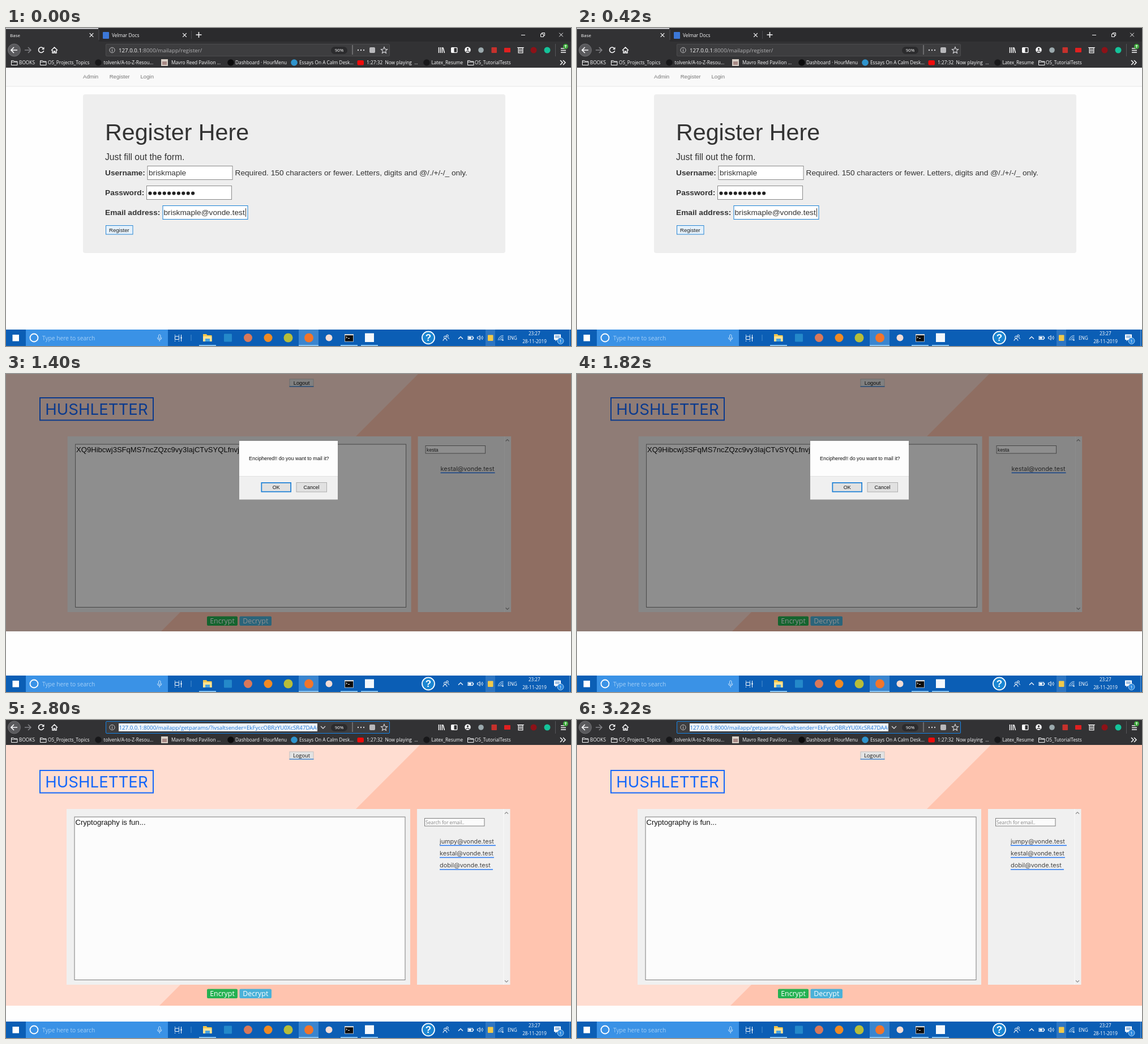
Animation of 998x561 px, one loop 3.5 s. Source, as an HTML page:

```html
<!DOCTYPE html>
<html lang="en">
<head>
<meta charset="utf-8">
<title>Mail app walkthrough</title>
<style>
  html, body { margin: 0; width: 100%; height: 100%; overflow: hidden; background: #fefefe; }
  #stage { display: block; width: 998px; height: 561px; font-family: "Liberation Sans", Arial, sans-serif; }
  .ui { font-family: "Open Sans", "Noto Sans", sans-serif; }
  .rb { font-family: Roboto, sans-serif; }
  .geo { font-family: Inter, sans-serif; }
  text { white-space: pre; }
</style>
</head>
<body>
<svg id="stage" viewBox="0 0 998 561"></svg>
<script>
const STEP = 700;
const USER = 'briskmaple', FRIEND = 'kestal', HOST = '@vonde.test';
const LINK = '127.0.0.1:8000/mailapp/getparams/?ivsaltsender=EkFyccOBRzYU0XcSR47DAA==|@@@@@|STee25g1e7g=|!!!!!|jumpy' + HOST;

// Drawing helpers, each returns SVG markup
const rect = (x, y, w, h, fill, more = '') =>
  `<rect x="${x}" y="${y}" width="${w}" height="${h}" fill="${fill}" ${more}/>`;
const box = (x, y, w, h, fill, line, lw = 1, more = '') =>
  rect(x + lw / 2, y + lw / 2, w - lw, h - lw, fill, `stroke="${line}" stroke-width="${lw}" ${more}`);
const disc = (x, y, r, fill, more = '') => `<circle cx="${x}" cy="${y}" r="${r}" fill="${fill}" ${more}/>`;
const path = (d, line, lw = 1, fill = 'none', more = '') =>
  `<path d="${d}" stroke="${line}" stroke-width="${lw}" fill="${fill}" ${more}/>`;
const text = (x, y, size, str, fill = '#333', more = '') =>
  `<text x="${x}" y="${y}" font-size="${size}" fill="${fill}" ${more}>${str}</text>`;
const ui = (x, y, size, str, fill = '#fff', more = '') => text(x, y, size, str, fill, 'class="ui" ' + more);
const move = (x, y, s) => `<g transform="translate(${x} ${y})">${s}</g>`;
const clip = (x, y, w, h, s) =>
  `<svg x="${x}" y="${y}" width="${w}" height="${h}" viewBox="${x} ${y} ${w} ${h}">${s}</svg>`;
const dots = (n, x, y, gap, r, fill) =>
  Array.from({ length: n }, (_, i) => disc(x + i * gap, y, r, fill)).join('');
const cross = (x, y, r, line, lw = 1.2) =>
  path(`M${x - r} ${y - r}l${2 * r} ${2 * r}m0 ${-2 * r}l${-2 * r} ${2 * r}`, line, lw);
const caret = (x, y, fill) => path(`M${x - 3} ${y - 1.5}h6l-3 3z`, 'none', 0, fill);
const BOLD = 'font-weight="700"', MID = 'text-anchor="middle"';

function folder(x, y) {
  return path(`M${x + .5} ${y - 3.5}h4l1.5 1.5h5v6.5h-10.5zM${x + .5} ${y - 1}h10`, '#f9f9fa', 1);
}

function urlField(focused) {
  const frame = box(176, 28, 502, 22, '#3d3d3f', focused ? '#1583e6' : '#4c4c4e', 1, 'rx="1.5"');
  const info = disc(187.5, 39, 4.6, 'none', 'stroke="#c4c4c6"') + rect(187, 38, 1, 4, '#c4c4c6') + rect(187, 36, 1, 1.2, '#c4c4c6');
  const url = focused
    ? clip(199, 31, 351, 16, rect(199, 32, 351, 14, '#eef4fb') + ui(199.5, 43, 9.7, LINK, '#1b74d4')) +
      path('M556 37l4 4 4-4', '#d7d7db', 1.3)
    : ui(199, 43, 9.7, '127.0.0.1<tspan fill="#b1b1b3">:8000/mailapp/register/</tspan>', '#f9f9fa');
  return frame + info + url +
    rect(574, 33, 29, 13, '#2b2b2d', 'rx="6.5"') + ui(588.5, 42.3, 8, '90%', '#fff', MID) +
    rect(611.5, 30, 1, 17, '#9a9a9c') + dots(3, 622, 39, 5, 1.2, '#d7d7db') +
    rect(642, 34, 10, 10, '#b9b9bc', 'rx="2"') +
    path('M668 33.5l1.6 3.7 4 .4-3 2.7.9 4-3.5-2.1-3.5 2.1.9-4-3-2.7 4-.4z', '#d7d7db', 1.1);
}

function chrome(focused) {
  const w = '#f9f9fa';
  const tabs = rect(0, 0, 998, 70, '#323234') + rect(164, 0, 834, 24, '#2b2b2d') +
    rect(0, 0, 163, 1.6, '#e4e4e8') + rect(163.5, 3, 1, 18, '#55555a') + rect(327, 5, 1, 14, '#4a4a4d') +
    ui(7, 15.5, 8, 'Base', w) + cross(151, 12.5, 3.3, w) +
    rect(171, 7, 11, 12, '#3c78d8', 'rx="1"') + ui(187, 15.5, 8.3, 'Velmar Docs', w) + cross(315.5, 12.5, 3.3, w) +
    path('M335.5 12h10M340.5 7v10', w, 1.5) + path('M910 12.5h7', w, 1) +
    path('M944.5 10.5h5v5h-5zM946.500 10.500v-2h5v5h-2', w, 1) + cross(980.5, 12, 3.3, w, 1);
  const nav = disc(14.5, 39, 11, '#5a5a5d', 'stroke="#7a7a7d" stroke-width=".8"') +
    path('M20 39h-10.500M14 34l-5 5 5 5', w, 1.7) + path('M33 39h10.500M39 34l5 5-5 5', '#838386', 1.5) +
    path('M66 36a4.700 4.700 0 1 0 .7 4', w, 1.6) + path('M67.500 33.500v4.500h-4.500z', 'none', 0, w) +
    path('M80 39.500l5.500-5.500 5.500 5.500M82 39v5h2.500v-3h2v3h2.500v-5', w, 1.5);
  const tools = path('M764.500 34v10M767.500 34v10M770.500 34v10M772 34.500l2.500 9.500', w, 1.5) +
    box(786, 34, 11.5, 10, 'none', w, 1.3, 'rx="1"') + rect(787, 35, 4.5, 8, w) +
    disc(815.5, 38.5, 5.3, w) + disc(815.5, 37, 1.7, '#323234') + path('M812.500 42q3-3 6 0', '#323234', 1.2) +
    disc(839, 39, 4.8, '#9ba9ad') + rect(857.5, 34, 9.5, 10, '#c6312c', 'rx="1"') +
    rect(880, 35, 11, 8, '#e02020', 'rx="1"') +
    box(904.5, 34.5, 9, 10, 'none', w, 1.2) + path('M903 34.500h12M907 37v5M909 37v5M911 37v5', w, 1) +
    disc(932, 39, 5.5, '#8d1218') + disc(956, 39, 5.5, '#15c39a') +
    rect(970, 28, 1, 22, '#55555a') + path('M980 36h9M980 39.500h9M980 43h9', w, 1.5) +
    disc(988.5, 32.5, 4.5, '#3fa83c') + path('M988.500 35v-4.500M986.500 32l2-2 2 2', '#fff', 1);
  const marks = [[23, 'BOOKS'], [74, 'OS_Projects_Topics'], [172.5, 'tolvenk/A-to-Z-Resou...'],
    [292, 'Mavro Reed Pavilion ...'], [405, 'Dashboard · HourMenu'], [518, 'Essays On A Calm Desk...'],
    [637, '1:27:32  Now playing  ...'], [751.5, 'Latex_Resume'], [828, 'OS_TutorialTests']];
  const icons = folder(9, 61) + folder(60, 61) + folder(815, 61) +
    disc(163, 61, 5.8, '#18181a') + disc(743, 61, 5.8, '#18181a') + disc(397, 61, 5.8, '#0c0c0d') +
    rect(274, 55, 12, 12, '#d8cfc6') + rect(276, 59, 8, 6, '#a88a86') +
    disc(509, 61, 5.8, '#2f94cd') + rect(620.5, 57, 11.5, 8.5, '#f00b0b', 'rx="2"');
  return tabs + nav + urlField(focused) + tools + icons +
    marks.map(([x, s]) => ui(x, 64, 8.3, s, w)).join('') +
    path('M979 57l4 4-4 4M984 57l4 4-4 4', w, 1.5);
}

function site(x, w, h, title, body) {
  const grey = '#777';
  return rect(0, 0, 998, 33, '#f9f9f9') + rect(0, 32.5, 998, 1, '#e8e8e8') +
    text(x, 19, 9.6, 'Admin', grey) + text(x + 46.7, 19, 9.6, 'Register', grey) + text(x + 101.5, 19, 9.6, 'Login', grey) +
    rect(x, 47, w, h, '#eee', 'rx="4"') + text(x + 39, 128, 41.2, title) + body;
}

function registerScene() {
  const row = (y, label, x, line) =>
    text(175, y + 17, 13.7, label, '#333', BOLD) + box(x, y, 151, 25, '#fff', line);
  const body = text(175, 163, 15.7, 'Just fill out the form.') +
    row(173, 'Username:', 249.5, '#8a8a8a') + text(252, 190, 13.7, USER) +
    text(404.5, 190, 13.7, 'Required. 150 characters or fewer. Letters, digits and @/./+/-/_ only.') +
    row(208, 'Password:', 248, '#8a8a8a') + dots(10, 254.5, 221.5, 8.4, 3.1, '#222') +
    row(243, 'Email address:', 276.5, '#1a82d6') + text(278.5, 260, 13.7, USER + HOST) + rect(423, 248, 1, 15, '#333') +
    box(176, 278, 48.500, 16.500, '#e5f1fb', '#2a87d4') + text(182, 289.5, 9.6, 'Register', '#222');
  return move(0, 70, site(136, 746, 280, 'Register Here', body)) + chrome(false);
}

function loginScene() {
  const body = text(176, 155, 9.7, 'Username:', '#333', BOLD) + box(228.5, 143, 123, 17.500, '#fff8c6', '#8a8a78') +
    text(230.5, 155, 9.6, FRIEND) +
    text(354.5, 155, 9.7, 'Password:', '#333', BOLD) + box(405, 143, 123.500, 17.500, '#fff8c6', '#8a8a78') +
    dots(6, 410, 152.3, 5.9, 2.3, '#222') +
    box(532, 143.500, 36, 16, '#e1e1e1', '#b4b4b4') + text(538, 155, 9.6, 'Login', '#222');
  return site(137, 749, 146, 'Login here :', body);
}

// Encryption page; panels shift by dx when the page is scrolled
function cipherPage({ dx, body, search, typed, emails, logoutFont }) {
  const row = ([name, w], i) =>
    text(766, 218 + i * 21.2, 10.9, name + HOST, '#444', 'class="geo"') + rect(766, 220.5 + i * 21.2, w, 1.6, '#2f7cf0');
  const panels = rect(107, 157, 607, 310, '#f0f0f0') + box(120.500, 170.500, 585, 288.500, '#fcfcfc', '#7d7d7d') +
    text(122.5, 185, 13.05, body, '#111') +
    rect(726, 157, 164.500, 310, '#f0f0f0') + rect(878.5, 157, 1, 310, '#fafafa') +
    path('M881 165.500l3-3 3 3M881 459.500l3 3 3-3', '#909090', 1.2) +
    box(739, 173, 106.500, 14.500, '#fcfcfc', '#7d7d7d') +
    (typed ? text(741.5, 183.5, 8.6, search, '#222') : ui(741, 183.5, 8.5, search, '#858585')) +
    emails.map(row).join('');
  const button = (x, w, fill, s) =>
    rect(x, 474.5, w, 16.5, fill, 'rx="2"') + ui(x + w / 2, 487.3, 12.4, s, '#fff', MID);
  return rect(0, 44, 998, 460, '#ffddd1') + path('M731 44H998V504H271z', 'none', 0, '#ffc4af') +
    box(500.500, 55.500, 43, 14, '#e3e3e3', '#c2c2c2') + rect(500.5, 68.5, 43, 1.3, '#2f80d8') +
    text(522, 65.7, 9.3, 'Logout', '#111', MID + logoutFont) +
    box(59, 88, 202, 41.500, 'none', '#1467fa', 2) +
    text(160, 118.500, 27.6, 'HUSHLETTER', '#1467fa', MID + ' class="geo"') +
    move(dx, 0, panels) + button(355, 54, '#25b152', 'Encrypt') + button(412.5, 56.5, '#4ab1d8', 'Decrypt');
}

function confirmScene() {
  const page = cipherPage({
    dx: 1.6, body: 'XQ9Hibcwj3SFqMS7ncZQzc9vy3IajCTvSYQLfnvj', search: FRIEND.slice(0, 5),
    typed: true, emails: [[FRIEND, 96]], logoutFont: ''
  });
  const dialog = rect(412, 118, 174, 103.5, '#f0f0f0') + rect(412, 118, 174, 62.5, '#fdfdfd') + rect(412, 180, 174, 1, '#e2e2e2') +
    text(429, 152, 8.95, 'Enciphered!! do you want to mail it?', '#111') +
    box(450.500, 191, 53.500, 17.500, '#e1e1e1', '#1a7fd6', 1.7) + text(477.3, 202.5, 9, 'OK', '#111', MID) +
    box(512.500, 191, 54.500, 17.500, '#e1e1e1', '#adadad') + text(539.5, 202.5, 9, 'Cancel', '#111', MID);
  return clip(0, 0, 998, 454, move(0, -47, cipherPage && page) + path('M275 454l-4 4h727v-4z', 'none', 0, '#ffc4af') +
    rect(0, 0, 998, 454, '#000', 'opacity=".44"')) + dialog;
}

function composeScene() {
  const g = '#606367', rb = 'class="rb" ';
  const line = (x, y, w) => `M${x} ${y}h${w}`;
  const rows = (x, w) => [401.5, 405.5, 409.5].map(y => line(x, y, w)).join('');
  const seps = [200, 237, 342, 494, 521].map(x => rect(x, 399, 1, 13, '#e0e0e0')).join('');
  const letter = (x, s, more = '') => text(x, 409.5, 12, s, g, rb + MID + ' ' + more);
  const format = rect(72, 392, 476, 27, '#fff', 'rx="2" filter="url(#soft)"') + seps +
    path('M81 401v4.500h4.500M81.500 405q5-5 9.500 2.500M114 401v4.500h-4.500M113.500 405q-5-5-9.500 2.500', g, 1.5) +
    text(128, 409, 10.4, 'Sans Serif', '#555', rb + 'font-weight="500"') + caret(191, 405, g) +
    path('M206 405h6M209 405v6M211 401.500h9M215.500 401.500v9.500', g, 1.8) + caret(226.5, 405, g) +
    letter(249, 'B', BOLD) + letter(272, 'I', 'font-style="italic" ' + BOLD) + letter(296, 'U') + path(line(291, 411.5, 10), g, 1.2) +
    letter(319, 'A') + path(line(314, 411.5, 10), g, 1.5) + caret(332, 405, g) +
    path('M349 401h12M349 404h8M349 407h12M349 410h8', g, 1.4) + caret(368, 405, g) +
    path(rows(385.5, 8), g, 1.5) + path('M382 400v3M382 404v3M382 408v3', g, 1.2) +
    path(rows(408.5, 8), g, 1.5) + dots(3, 0, 0, 0, 0, g) + [401.5, 405.5, 409.5].map(y => disc(405.5, y, 1.2, g)).join('') +
    path('M428 400.500h12M433 403.800h7M433 407.200h7M428 410.500h12', g, 1.4) + path('M431 403v5l-3-2.500z', 'none', 0, g) +
    path('M451 400.500h12M456 403.800h7M456 407.200h7M451 410.500h12', g, 1.4) + path('M451 403v5l3-2.500z', 'none', 0, g) +
    path('M476 402h4v4l-1.500 3h-2l1-3h-1.500zM482 402h4v4l-1.500 3h-2l1-3h-1.500z', 'none', 0, g) +
    letter(508, 'S') + path(line(502, 405.5, 12), g, 1.3) +
    path('M531 401h9M536 401l-2.500 9.500M530 401l10 10', g, 1.5);
  const actions = rect(72, 432, 71, 27, '#1a73e8', 'rx="3"') + rect(125, 432, 1, 27, '#1560c8') +
    text(98.5, 449, 10.6, 'Send', '#fff', rb + MID + ' ' + BOLD) + caret(134, 445.5, '#fff') +
    rect(149, 434, 20, 21, '#e6e6e6', 'rx="2"') + text(159, 448, 12, 'A', '#222', rb + MID) + rect(153.5, 450, 11, 1.5, '#222') +
    path('M186 441v7a3 3 0 0 1-6 0v-8a2 2 0 0 1 4 0v7a.8 .8 0 0 1-2 0v-6', g, 1.2) +
    path('M205 442h-2a3 3 0 0 0 0 6h2M207 442h2a3 3 0 0 1 0 6h-2M203.500 445h5', g, 1.5) +
    disc(229.5, 445, 5.6, 'none', `stroke="${g}" stroke-width="1.3"`) + disc(227.5, 443.5, 1, g) + disc(231.5, 443.5, 1, g) +
    path('M226.500 446.500q3 3.500 6 0', g, 1.2) + disc(253, 445, 5, g) +
    rect(270.5, 439.5, 11.5, 11, g, 'rx="1"') + path('M272 448.500l2.500-3 2 2 2-3 3 4z', 'none', 0, '#fff') +
    rect(293.5, 441, 9, 9, g, 'rx="1"') + path('M296 441v-2h4v2', g, 1.2) +
    disc(302, 447, 4, '#fff', `stroke="${g}" stroke-width="1.2"`) + path('M302 445v2.300l1.500 1', g, 1) +
    [440.5, 444.7, 449].map(y => disc(898, y, 1.2, g)).join('') +
    rect(914.5, 442, 8, 9, g, 'rx="1"') + path('M913 440.500h11M916.500 439h4', g, 1.4);
  return clip(0, 0, 998, 463,
    rect(60.5, 4, 877.5, 480, '#fff', 'filter="url(#soft)"') + move(0, -66, chrome(false)) +
    rect(60.5, 4, 877.5, 26.5, '#404040') +
    text(70, 21, 10.2, 'New Message', '#fff', rb + 'font-weight="500"') +
    text(72, 47.5, 10.2, FRIEND + HOST, '#222', rb) + rect(72, 49.5, 84, 1, '#f2c14e') +
    rect(72, 56, 853, 1, '#ececec') + text(72, 74, 10.2, 'Subject', '#8a8a8a', rb) + rect(72, 82.5, 853, 1, '#ececec') +
    text(73, 105.3, 13.12, LINK, '#222') + format + actions + disc(912.5, 411.8, 8.2, '#15c39a'));
}

function resultScene() {
  return cipherPage({
    dx: 0, body: 'Cryptography is fun...', search: 'Search for email..', typed: false,
    emails: [['jumpy', 99], [FRIEND, 96], ['dobil', 94]], logoutFont: ' class="ui"'
  }) + move(0, -26, chrome(true));
}

function taskbar() {
  const w = '#fff', pale = '#c9e2f8';
  const running = [[341, 30], [517, 35], [591, 30], [627, 30]].map(([x, n]) => rect(x, 559, n, 2, '#86c3f2')).join('');
  return rect(0, 532, 998, 29, '#0b5eb5') + rect(35, 532, 251, 29, '#3a92e6') +
    rect(517, 532, 35, 29, '#3a85cf') + rect(847, 532, 17, 29, '#2d75c2') + running +
    rect(11.5, 541, 11.5, 11.5, w) + disc(49.5, 546.5, 7, 'none', 'stroke="#fff" stroke-width="1.8"') +
    ui(64, 550.7, 10.2, 'Type here to search', '#a5d0f7') +
    rect(269.5, 541, 3.5, 7, 'none', `rx="1.7" stroke="${pale}"`) + path('M267.500 546q0 4 3.700 4t3.700-4M271.200 550v3', pale, 1) +
    box(298, 543.500, 8, 6.500, 'none', w) + path('M298.500 541v1.500M305.500 541v1.500M298.500 551.500v1.500M305.500 551.500v1.500M309.500 541v12', w, 1) +
    rect(308.5, 545, 2, 3, w) + rect(326.5, 541, 1, 11, '#4a8bcc') +
    path('M348 540h6l1.500 2h8v11h-15.500z', 'none', 0, '#f3c64d') + rect(348, 544, 15.5, 9, '#fde292') + rect(352, 548, 8, 5, '#4aa3e0') +
    rect(385, 539.5, 14, 14, '#2489ca', 'rx="1"') + disc(427.5, 546.5, 7.5, '#d9785a') + disc(463, 546.5, 7.5, '#f08a24') +
    disc(498.5, 546.5, 8, '#b7bd3a') + disc(535, 546.5, 8, '#f2752b') + disc(570.5, 546.5, 6, '#f3dcd4') +
    box(598, 540, 16, 13.500, '#0c0c0c', '#d8d8d8', .8) + rect(598, 540, 16, 2.2, '#d8d8d8') +
    path('M600.500 544.500l2 1.300-2 1.300M604 547.500h3', w, .9) + rect(634, 538.5, 16, 15.5, '#f4f8fc') +
    disc(746, 546.3, 11, '#1b86d2', 'stroke="#fff" stroke-width="1.8"') +
    text(746, 552.3, 17, '?', w, MID + ' ' + BOLD) +
    disc(775.5, 545.5, 2, 'none', `stroke="${w}"`) + path('M772 552q0-4 3.500-4t3.500 4', w, 1) + disc(779.5, 543, 1.8, 'none', `stroke="${w}"`) + path('M780 546q2 0 2.500 2.500', w, 1) +
    path('M799 548.500l4-4 4 4', w, 1.2) +
    box(815.500, 543.500, 9.500, 6.500, 'none', w) + rect(817, 545, 5, 3.5, w) + rect(825, 545.5, 1.2, 2.5, w) +
    path('M832.500 545h2l2.500-2.500v8l-2.500-2.500h-2z', w, .9) + path('M839 544.500q1.500 2 0 4M841 543q2.800 3.500 0 7', w, .9) +
    rect(851, 541.5, 9.5, 10.5, '#f0c94a', 'rx="1"') +
    path('M869.500 551a9 9 0 0 1 9-8.500M872 551a6.500 6.500 0 0 1 6.500-6M874.500 551a4 4 0 0 1 4-3.500', pale, 1) + disc(877.5, 550.5, 1.2, w) +
    ui(886, 549.5, 8.3, 'ENG') + ui(933.3, 542.3, 8.1, '23:27', w, MID) + ui(933.5, 556, 8.2, '28-11-2019', w, MID) +
    path('M968 540.500h12v9.500h-7l-2.500 2.500v-2.500h-2.500z', 'none', 0, w) + path('M970 543.500h8M970 546h8', '#0b5eb5', .9) +
    disc(979.5, 552, 5.5, '#2d8ae0', 'stroke="#cfe5f8" stroke-width=".8"') + ui(979.5, 555, 8, '1', w, MID) +
    rect(995, 532, 1, 29, '#5c96d0');
}

const scenes = [registerScene, loginScene, confirmScene, composeScene, resultScene];
const stage = document.getElementById('stage');
stage.innerHTML =
  '<defs><filter id="soft" x="-5%" y="-20%" width="110%" height="150%">' +
  '<feDropShadow dx="0" dy="1" stdDeviation="1.6" flood-color="#000" flood-opacity=".35"/></filter></defs>' +
  rect(0, 0, 998, 561, '#fefefe') +
  scenes.map(draw => `<g class="scene" opacity="0">${draw()}</g>`).join('') + taskbar();

// Hard cuts: each scene is shown for one step of the loop
const n = scenes.length;
stage.querySelectorAll('.scene').forEach((el, i) => {
  const cuts = Array.from({ length: n + 1 }, (_, k) => ({ opacity: +(k === i), offset: k / n, easing: 'step-end' }));
  el.animate(cuts, { duration: STEP * n, iterations: Infinity }).startTime = 0;
});
</script>
</body>
</html>
```
